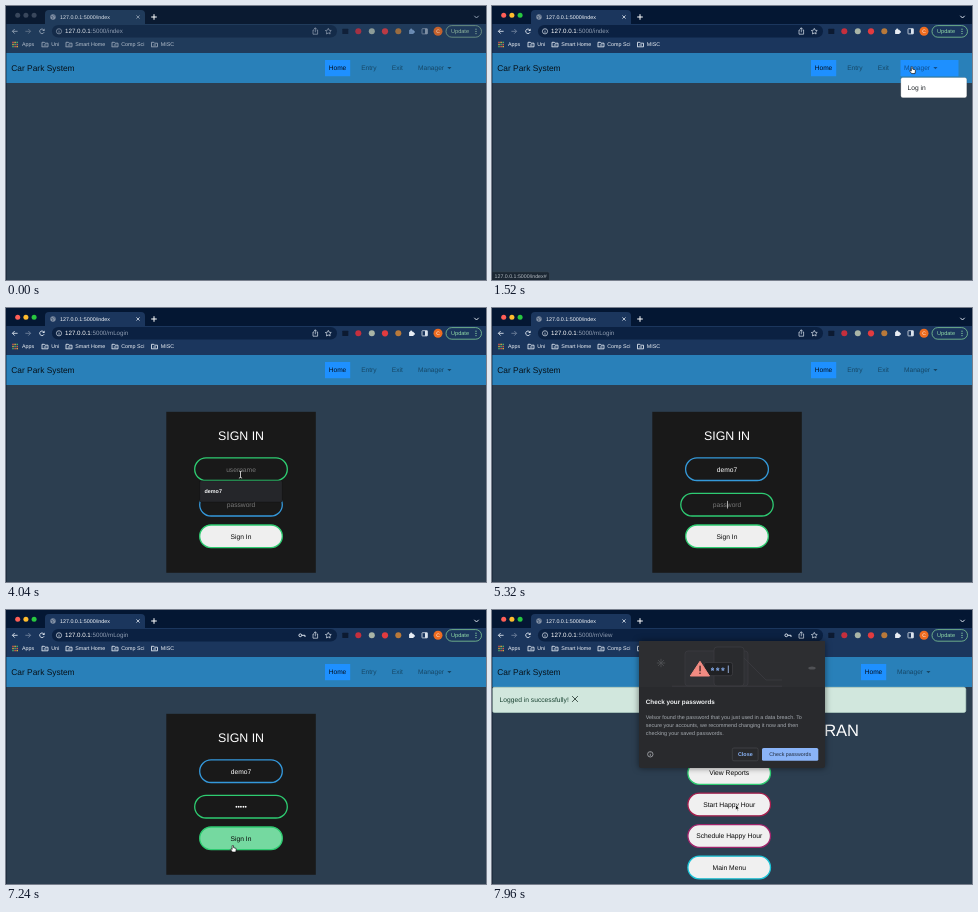
These frames come from a looping animation (480 by 274 pixels, 8 s). An HTML page with a canvas:

```html
<!DOCTYPE html>
<html lang="en">
<head>
<meta charset="utf-8">
<title>Car Park System</title>
<style>
html, body { margin: 0; width: 100%; height: 100%; overflow: hidden; background: #2c3e50; }
canvas { display: block; width: 100vw; height: 100vh; }
</style>
</head>
<body>
<canvas id="stage"></canvas>
<script>
const W = 480, H = 274, LOOP = 8000;
const canvas = document.getElementById('stage');
const c = canvas.getContext('2d');
const SANS = '"Liberation Sans", Arial, sans-serif';
const USER = 'demo7';

// Times of the hard changes, in ms
const T = {
  active: 440, hover: 1000, open: 1280, leave: 1720, login: 2280, loaded: 2560,
  focusUser: 3220, popup: 4040, typeUser: 4400, userDone: 4840,
  focusPass: 5120, typePass: 5920, passDone: 6240, mouseBack: 6760,
  hoverSign: 7100, submit: 7360, view: 7440, viewLoaded: 7560, dialog: 7680
};

// Mouse track: time, x, y
const track = [
  [0, 300, 290], [40, 300, 290], [1040, 420, 61], [1640, 420, 61], [2080, 418, 80],
  [2560, 418, 80], [3200, 234.5, 166.5], [6760, 234.5, 166.5], [7140, 226.8, 235.5],
  [7400, 226.8, 235.5], [7920, 243.5, 194.5], [LOOP, 243.5, 194.5]
];

const clamp = v => Math.max(0, Math.min(1, v));
const smooth = v => { v = clamp(v); return v * v * (3 - 2 * v); };
const mix = (a, b, k) => a + (b - a) * k;
const span = (t, from, len) => smooth((t - from) / len);
const blend = (a, b, k) => `rgb(${a.map((v, i) => Math.round(mix(v, b[i], k)))})`;

function rect(x, y, w, h, fill) {
  c.fillStyle = fill;
  c.fillRect(x, y, w, h);
}

function round(x, y, w, h, r, fill, stroke, lw = 1) {
  c.beginPath();
  c.roundRect(x, y, w, h, r);
  if (fill) { c.fillStyle = fill; c.fill(); }
  if (stroke) { c.strokeStyle = stroke; c.lineWidth = lw; c.stroke(); }
}

function dot(x, y, r, fill, stroke, lw = .7) {
  c.beginPath();
  c.arc(x, y, r, 0, 7);
  if (fill) { c.fillStyle = fill; c.fill(); }
  if (stroke) { c.strokeStyle = stroke; c.lineWidth = lw; c.stroke(); }
}

function line(points, stroke, lw = .9, fill) {
  c.beginPath();
  for (let i = 0; i < points.length; i += 2) c.lineTo(points[i], points[i + 1]);
  if (fill) { c.closePath(); c.fillStyle = fill; c.fill(); }
  if (stroke) { c.strokeStyle = stroke; c.lineWidth = lw; c.stroke(); }
}

// y is the middle of the capital letters
function text(s, x, y, size, fill, align = 'left', weight = 400) {
  c.font = `${weight} ${size}px ${SANS}`;
  c.textAlign = align;
  c.fillStyle = fill;
  c.fillText(s, x, y + size * .35);
  return c.measureText(s).width;
}

function cross(x, y, r, color, lw) {
  line([x - r, y - r, x + r, y + r], color, lw);
  line([x + r, y - r, x - r, y + r], color, lw);
}

function tabStrip(on, loading, fg) {
  rect(0, 0, W, 19, on ? '#041733' : '#0a1a31');
  round(39, 4, 100, 18, [4, 4, 0, 0], on ? '#1b365d' : '#203b5b');
  ['#ff5f57', '#febc2e', '#28c840'].forEach((col, i) =>
    dot(11.7 + i * 8.2, 9.3, 2.5, on ? col : '#39475c'));
  if (loading) {
    line([47.5, 10.7, 50.5, 10.7], '#7fa9e8', .8);
  } else {
    dot(47, 11, 2.7, '#8492a6');
    line([45, 10, 47, 11, 46.6, 13], '#33496a', .7);
    line([47.4, 8.7, 48.8, 10.6], '#33496a', .7);
  }
  text('127.0.0.1:5000/index', 54, 10.9, 5.35, on ? '#f4f7fb' : '#d9e0e8', 'left', 500);
  cross(132, 11, 1.6, fg, .8);
  line([145.2, 11, 150.8, 11], '#fff', 1);
  line([148, 8.2, 148, 13.8], '#fff', 1);
  line([468.3, 9.8, 470.5, 12, 472.7, 9.8], fg, 1);
}

function star(x, y, r, color) {
  const pts = [];
  for (let i = 0; i <= 10; i++) {
    const a = i * Math.PI / 5 - Math.PI / 2, d = i % 2 ? r * .5 : r;
    pts.push(x + d * Math.cos(a), y + d * Math.sin(a));
  }
  line(pts, color, .7);
}

function folder(x, y, color) {
  line([x, y + 2.2, x, y - 2.3, x + 2.3, y - 2.3, x + 3, y - 1.4, x + 6, y - 1.4,
    x + 6, y + 2.2, x - .3, y + 2.2], color, .9);
  line([x + 1.8, y + .4, x + 4.5, y + .4], color, .9);
}

function toolbar(t, on, loading, fg) {
  rect(0, 18, W, 29, on ? '#1b365d' : '#203b5b');
  const dim = on ? '#71839e' : '#61738a';
  for (const [x, d, col] of [[9, -1, fg], [22, 1, dim]]) {
    line([x - 2.6, 25.3, x + 2.6, 25.3], col);
    line([x + d * .3, 23, x + d * 2.6, 25.3, x + d * .3, 27.6], col);
  }
  if (loading) cross(36, 25.3, 2.1, fg, .9);
  else {
    c.beginPath();
    c.arc(36, 25.3, 2.3, .4, 5.5);
    c.strokeStyle = fg; c.lineWidth = .9; c.stroke();
    line([38.6, 22.5, 38.6, 25, 36.2, 25], null, 0, fg);
  }

  round(46, 19, 285, 12.5, 6.2, on ? '#0b2142' : '#142b49');
  dot(53, 25.3, 2.6, null, fg);
  line([53, 25, 53, 26.8], fg, .7);
  line([53, 23.8, 53, 24.4], fg, .7);
  const page = t < T.login ? 'index' : t < T.view ? 'mLogin' : 'mView';
  const w = text('127.0.0.1', 59, 25.3, 6.2, on ? '#fff' : '#e2e7ed', 'left', 500);
  text(':5000/' + page, 59 + w, 25.3, 6.2, '#8d9bb0');
  if (t >= 5960) {
    dot(294.3, 25.3, 1.4, null, fg, 1);
    line([295.8, 25.3, 299, 25.3, 299, 27], fg, 1);
  }
  line([308, 24, 307, 24, 307, 28.2, 311.6, 28.2, 311.6, 24, 310.6, 24], fg, .7);
  line([309.3, 26.3, 309.3, 21.8], fg, .7);
  line([307.9, 23.2, 309.3, 21.8, 310.7, 23.2], fg, .7);
  star(322.3, 25.5, 3.1, fg);

  c.globalAlpha = on ? 1 : .8;
  round(336.3, 22.8, 6, 5.2, .5, '#0c1a31');
  dot(352.3, 25.3, 3, '#c52f3d');
  dot(365.8, 25.3, 3, '#a9b5a7');
  dot(379, 25.3, 3.1, '#e23b3f');
  dot(392.3, 25.3, 3, '#b9793a');
  round(403.1, 23.7, 4.5, 4.4, .5, on ? '#e8edf4' : '#7a9cc6');
  dot(405.2, 23.5, 1.1, on ? '#e8edf4' : '#7a9cc6');
  dot(407.8, 25.9, 1.1, on ? '#e8edf4' : '#7a9cc6');
  round(416, 22.7, 5.4, 5.2, .5, null, fg, .8);
  rect(419, 22.7, 2.4, 5.2, fg);
  dot(432, 25.3, 4.5, '#ee6c20');
  text('C', 432, 25.4, 5, '#fff', 'center');
  c.globalAlpha = 1;
  round(440, 19.6, 35.5, 11.6, 5.8, null, on ? '#81c995' : '#789d88', .8);
  text('Update', 445, 25.4, 5.6, on ? '#92dba7' : '#8fb69d', 'left', 500);
  for (const y of [23.2, 25.4, 27.6]) dot(470, y, .6, on ? '#92dba7' : '#8fb69d');

  const grid = ['#e85b4c', '#e9b53a', '#54b46b'];
  for (let i = 0; i < 9; i++)
    rect(6.3 + i % 3 * 2.1, 35.7 + Math.floor(i / 3) * 2.1, 1.4, 1.4, grid[(i + Math.floor(i / 3)) % 3]);
  const label = (s, x) => text(s, x, 38.6, 5.35, on ? '#eef2f7' : '#b6c1ce', 'left', 500);
  label('Apps', 16);
  [['Uni', 36], ['Smart Home', 60], ['Comp Sci', 106], ['MISC', 145.5]].forEach(([s, x]) => {
    folder(x, 38.6, fg);
    label(s, x + 9.2);
  });
}

function manager(x, y, col) {
  text('Manager', x, y, 6.6, col);
  line([x + 29.3, y - .9, x + 33.5, y - .9, x + 31.4, y + 1.2], null, 0, col);
}

function nav(t) {
  rect(0, 47, W, 30, '#2980b9');
  text('Car Park System', 5.3, 62, 8.4, '#071018');
  const view = t >= T.view;
  const homeX = view ? 369 : 319;
  rect(homeX, 54, 25.2, 16.2, '#1e90ff');
  text('Home', homeX + 3.7, 62, 6.6, '#06101c');
  const faint = '#164666';
  if (view) return manager(405, 62, faint);
  text('Entry', 355.2, 62, 6.6, faint);
  text('Exit', 385.8, 62, 6.6, faint);
  const lit = t >= T.hover && t < T.login;
  if (lit) rect(408.5, 54, 58, 16.2, '#1e90ff');
  manager(412, 62, lit ? '#104f8c' : faint);
  if (t >= T.open && t < T.login) {
    round(408.8, 71.5, 66, 20.2, 2, '#fff', 'rgba(0,0,0,.3)', .5);
    text('Log in', 415.6, 81.6, 6.7, '#212529');
  }
}

function field(y, focus, value, hint, caret) {
  const half = mix(41.3, 46.3, focus);
  round(235 - half, y - 11.3, half * 2, 22.6, 11.3, null, blend([52, 152, 219], [46, 204, 113], focus), 1.3);
  const w = text(value || hint, 235, y + .1, 6.7, value ? '#fff' : '#777', 'center', value ? 500 : 400);
  if (caret) rect(235 + (value ? w / 2 : 0), y - 3.8, .7, 7.6, '#e8e8e8');
}

function typed(t, from, to, s) {
  if (t < from) return '';
  return s.slice(0, 1 + Math.floor(clamp((t - from) / (to - from)) * (s.length - 1)));
}

const blink = (t, from) => Math.floor((t - from) / 500) % 2 === 0;

function signIn(t) {
  rect(160.3, 103.8, 149.5, 161, '#191919');
  text('SIGN IN', 235, 128, 12.4, '#fff', 'center', 500);
  const toPass = span(t, T.focusPass, 220);
  const userFocus = span(t, T.focusUser, 220) * (1 - toPass);
  const name = typed(t, T.typeUser, T.userDone - 40, USER);
  const pass = typed(t, T.typePass, T.passDone, '•••••');
  const inUser = t >= T.focusUser && t < T.focusPass;
  const inPass = t >= T.focusPass && t < 6500;
  field(161.2, userFocus, name, 'username',
    inUser && (name ? t < T.userDone || blink(t, T.userDone) : blink(t, T.focusUser)));
  field(196.7, toPass, pass, 'password',
    inPass && (pass ? true : blink(t, T.focusPass)));
  const hover = span(t, T.hoverSign, 240);
  round(193.7, 217, 82.6, 22.6, 11.3, blend([239, 239, 239], [46, 204, 113], hover), '#2ecc71', 1.3);
  text('Sign In', 235, 228.3, 6.7, '#080808', 'center');
  if (t >= T.popup && t < T.userDone) {
    round(193.7, 172.8, 82.6, 21.2, 1, '#25262a', 'rgba(0,0,0,.5)', .5);
    text(USER, 198.5, 183.6, 5.4, '#f1f3f4', 'left', 700);
  }
}

function viewPage() {
  round(.3, 77.3, 473.5, 25.2, 2, '#d1e7dd', '#badbcc', .6);
  text('Logged in successfully!', 7.6, 90, 6.7, '#17402f');
  cross(83, 89, 2.9, '#33453d', .9);
  text('WELCOME NOLDRAN', 367, 120.2, 16.5, '#fff', 'right');
  [['View Reports', '#2ecc71'], ['Start Happy Hour', '#a61e4d'],
    ['Schedule Happy Hour', '#a0246c'], ['Main Menu', '#1bc5d8']].forEach(([s, col], i) => {
    const y = 163 + i * 31.5;
    round(195.9, y - 11.3, 82.6, 22.6, 11.3, '#f0f0f0', col, 1.3);
    text(s, 237.2, y, 6.75, '#080808', 'center');
  });
}

function dialog(t) {
  const k = span(t, T.dialog - 20, 100);
  if (!k) return;
  c.save();
  c.globalAlpha = k;
  c.shadowColor = 'rgba(0,0,0,.5)';
  c.shadowBlur = 6;
  round(147, 31, 186, 127, 2, '#292a2d');
  c.shadowBlur = 0;
  rect(147, 31, 186, 46, '#2d2e31');

  // Dim devices behind the warning sign
  const edge = '#3b3c40';
  round(193, 41, 63, 35, 3, '#303135', edge, .8);
  round(222, 37, 30, 39, 3, '#2a2b2e', edge, .8);
  line([180, 76.2, 290, 76.2], edge, .9);
  line([252, 48, 274, 70, 290, 70], edge, .8);
  for (let i = 0; i < 4; i++) {
    const a = i * Math.PI / 4, x = 4.2 * Math.cos(a), y = 4.2 * Math.sin(a);
    line([169 - x, 53 - y, 169 + x, 53 + y], '#505155', .8);
  }
  c.beginPath();
  c.ellipse(320, 58, 3.7, 1.6, 0, 0, 7);
  c.fillStyle = '#505155';
  c.fill();
  round(212, 52.5, 28.5, 13.2, 2, '#202124', '#45464b', .6);
  for (let i = 0; i < 3; i++) {
    const x = 220.5 + i * 5.2;
    star(x, 59.2, 1.6, '#8ab4f8');
    dot(x, 59.2, .7, '#8ab4f8');
  }
  line([236.3, 55.5, 236.3, 63], '#aecbfa', .8);
  line([208, 51.3, 217.5, 66, 198.3, 66], '#f28b82', 1, '#f28b82');
  rect(207.4, 55.7, 1.3, 5.6, '#3a2020');
  dot(208, 63.3, .8, '#3a2020');

  text('Check your passwords', 153.8, 91.6, 6.3, '#f1f3f4', 'left', 700);
  ['Velsor found the password that you just used in a data breach. To',
    'secure your accounts, we recommend changing it now and then',
    'checking your saved passwords.'].forEach((s, i) => text(s, 153.8, 107.2 + i * 8.2, 5.4, '#a6abb1'));
  dot(158.3, 144.3, 2.7, null, '#bdc1c6', .7);
  line([158.3, 144, 158.3, 145.9], '#bdc1c6', .7);
  line([158.3, 142.6, 158.3, 143.2], '#bdc1c6', .7);
  round(240.3, 138, 25.8, 12.8, 1.6, null, '#4a4c51', .6);
  text('Close', 253.3, 144.4, 5.4, '#8ab4f8', 'center', 700);
  round(270, 138, 56.3, 12.8, 1.6, '#8ab4f8');
  text('Check passwords', 298.2, 144.4, 5.3, '#202a3b', 'center', 500);
  c.restore();
}

function status(t) {
  if (t < T.hover || t >= 2600) return;
  const s = t < 1880 ? 'index#' : 'mLogin';
  round(0, 265.8, t < 1880 ? 57.5 : 59.5, 9, [0, 2, 0, 0], '#1b2733', '#3d4a57', .5);
  text('127.0.0.1:5000/' + s, 2.6, 270.3, 5.25, t < 1880 ? '#b4bbc2' : '#e0e4e8');
}

function mouse(t) {
  if (t < 40 || (t >= T.typeUser && t < T.mouseBack)) return;
  const i = Math.max(1, track.findIndex(p => p[0] > t));
  const [t0, x0, y0] = track[i - 1], [t1, x1, y1] = track[i];
  const k = smooth((t - t0) / (t1 - t0));
  c.save();
  c.translate(mix(x0, x1, k), mix(y0, y1, k));
  const overLink = (t >= T.hover && t < T.login) || (t >= T.hoverSign && t < T.view);
  const overField = (t >= 3120 && t < T.typeUser) || (t >= T.mouseBack && t < 6860);
  c.lineJoin = 'round';
  if (overField) {
    for (const [col, lw] of [['#111', 1.7], ['#f2f2f2', .8]]) {
      line([-1.6, -3.6, 0, -3, 1.6, -3.6], col, lw);
      line([0, -3, 0, 3], col, lw);
      line([-1.6, 3.6, 0, 3, 1.6, 3.6], col, lw);
    }
  } else if (overLink) {
    line([-.7, .3, 0, -.4, .7, .3, .8, 2.2, 3.1, 2.8, 3.5, 3.5, 3, 6.6, -.4, 6.6,
      -2.4, 3.9, -1.8, 3.2, -.7, 4, -.7, .3], '#111', .7, '#fff');
  } else {
    line([0, 0, 0, 5.8, 1.3, 4.6, 2.2, 6.7, 3.1, 6.3, 2.2, 4.3, 4, 4.2, 0, 0], '#fff', .7, '#111');
  }
  c.restore();
}

function draw(t) {
  const on = t >= T.active;
  const loading = (t >= T.login && t < T.loaded) || (t >= T.submit && t < T.viewLoaded);
  const fg = on ? '#dce4ee' : '#95a3b5';
  rect(0, 0, W, H, '#2c3e50');
  tabStrip(on, loading, fg);
  toolbar(t, on, loading, fg);
  nav(t);
  if (t >= T.view) viewPage();
  else if (t >= T.login) signIn(t);
  dialog(t);
  status(t);
  rect(0, 18, .6, H, 'rgba(10,20,35,.55)');
  mouse(t);
}

function frame(now) {
  const dpr = window.devicePixelRatio || 1;
  const w = Math.round(innerWidth * dpr), h = Math.round(innerHeight * dpr);
  if (canvas.width !== w || canvas.height !== h) { canvas.width = w; canvas.height = h; }
  c.setTransform(w / W, 0, 0, h / H, 0, 0);
  c.textRendering = 'geometricPrecision';
  draw(now % LOOP);
  requestAnimationFrame(frame);
}
requestAnimationFrame(frame);
</script>
</body>
</html>
```
